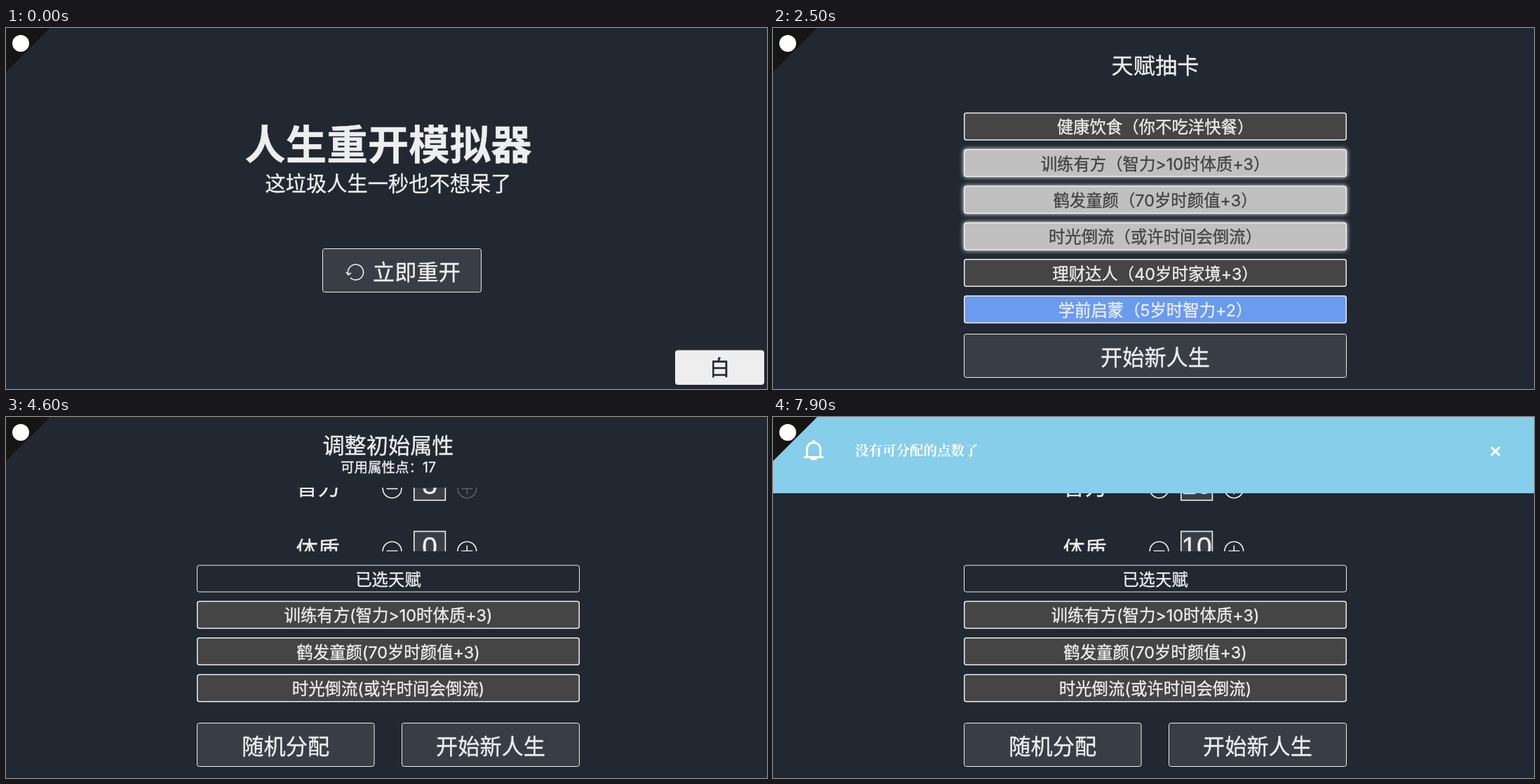
Animation of 1085 by 516 pixels, one loop 8000 ms. Source, as an HTML page:

```html
<!DOCTYPE html>
<html lang="zh-CN">
<head>
<meta charset="utf-8">
<title>人生重开模拟器</title>
<style>
  html, body { margin: 0; width: 100%; height: 100%; overflow: hidden; background: #222831; }
  svg { display: block; width: 1085px; height: 516px; }
  text {
    font-family: Inter, "Noto Sans CJK SC", "Noto Sans CJK", sans-serif; font-variant-ligatures: no-contextual;
    color: #eee; fill: currentColor; stroke: currentColor; stroke-width: .35;
    text-anchor: middle; white-space: pre;
  }
  .ui { font-family: "Liberation Sans", "Noto Sans CJK SC", "Noto Sans CJK", sans-serif; }
  .hint { font-family: "Noto Serif CJK SC", "Noto Sans CJK SC", "Noto Sans CJK", serif; font-weight: 700; color: #fff; stroke: none; text-anchor: start; }
  .line { fill: none; stroke: #eee; stroke-width: 1.6; }
  .icon { fill: none; stroke: #fff; stroke-width: 3; }
</style>
</head>
<body>
<svg viewBox="0 0 1085 516">
  <defs><clipPath id="window"><rect x="266" y="101" width="558" height="91"/></clipPath></defs>
  <g id="home"></g>
  <g id="talent"></g>
  <g id="attributes"></g>
  <g id="banner">
    <rect width="1085" height="109" fill="#87ceeb"/>
    <path class="icon" d="M48.5 56V46a9.5 9.5 0 0 1 19 0V56M44 57.500H72M58 33V37M53.500 60H62.500"/>
    <path class="icon" d="M1024 43L1036 55M1036 43L1024 55"/>
    <text class="hint" x="117" y="54.500" font-size="19.5">没有可分配的点数了</text>
  </g>
  <path d="M0 0H63L0 63Z" fill="#151513"/>
  <circle cx="21" cy="22" r="12" fill="#fff"/>
</svg>
<script>
const LOOP = 8000, TICK = 100, REM = 19.5, MID = 545, CARD_STEP = 52.3;
const BUTTON = [57, 62, 70], BUTTON_HOVER = [77, 68, 75];
const CARD = [70, 69, 69], CARD_HOVER = [80, 80, 80], PICKED = [192, 192, 192];
const BLUE = [100, 149, 237], BLUE_HOVER = [105, 155, 239];
const LIGHT = [238, 238, 238], DARK = [68, 68, 68];

const $ = id => document.getElementById(id);
const rgb = c => `rgb(${c.map(Math.round)})`;
const mix = (a, b, p) => rgb(a.map((v, i) => v + (b[i] - v) * p));
const ramp = (t, from, to) => Math.min(1, Math.max(0, (t - from) / (to - from)));
const pulse = (t, start, end, fade = 200) => ramp(t, start - TICK, start + TICK) * (1 - ramp(t, end, end + fade));
const during = (t, from, to) => t >= from && t < to;

function add(parent, tag, attrs, content = '') {
  const el = document.createElementNS('http://www.w3.org/2000/svg', tag);
  for (const key in attrs) el.setAttribute(key, attrs[key]);
  el.textContent = content;
  return parent.appendChild(el);
}

function label(parent, x, middle, rem, content, attrs = {}) {
  const size = rem * REM;
  return add(parent, 'text', { x, y: middle + size * .37, 'font-size': size, ...attrs }, content);
}

function panel(parent, x, y, w, h, fill, border = 1) {
  const inset = border / 2;
  return add(parent, 'rect', {
    x: x + inset, y: y + inset, width: w - border, height: h - border,
    rx: 3, fill, stroke: '#eee', 'stroke-width': border
  });
}

function button(parent, x, y, w, content, shift = 0) {
  const box = panel(parent, x, y, w, 63, rgb(BUTTON));
  const text = label(parent, x + w / 2 + shift, y + 33.5, 1.6, content, { class: 'ui' });
  return { box, text };
}

function card(parent, y, content, fill = CARD) {
  const box = panel(parent, 272, y, 546, 40, rgb(fill), 1.5);
  return { box, text: label(parent, MID, y + 21, 1.2, content) };
}

// Start page
const home = $('home');
label(home, MID, 166, 3, '人生重开模拟器', { 'font-weight': 700 });
label(home, MID, 222, 1.5, '这垃圾人生一秒也不想呆了');
button(home, 451, 315, 227, '立即重开', 21);
add(home, 'path', { class: 'line', d: 'M488 352A11 11 0 1 1 491 357M485 349L488 353L492 350' });
panel(home, 954, 460.5, 127, 49.5, '#eee');
label(home, 1017.5, 485, 1.5, '白', { style: 'color:#222831' });

// Talent page
const talent = $('talent');
label(talent, MID, 53, 1.6, '天赋抽卡');
const drawGroup = add(talent, 'g', {});
const draw = button(drawGroup, 449, 258, 192, '10连抽！');
const cardGroup = add(talent, 'g', {});
const cards = [
  '健康饮食（你不吃洋快餐）', '训练有方（智力>10时体质+3）', '鹤发童颜（70岁时颜值+3）',
  '时光倒流（或许时间会倒流）', '理财达人（40岁时家境+3）', '学前启蒙（5岁时智力+2）'
].map((content, i) => card(cardGroup, 120.8 + i * CARD_STEP, content, i === 5 ? BLUE : CARD));
const next = button(cardGroup, 272, 437, 546, '');
const pickTimes = { 1: 1700, 2: 1900, 3: 2200 };

// Attribute page
const attributes = $('attributes');
label(attributes, MID, 40, 1.6, '调整初始属性');
const points = label(attributes, MID, 72, 1, '');
const rows = add(attributes, 'g', { 'clip-path': 'url(#window)' });

function attributeRow(name, y) {
  label(rows, 444.7, y - 3.5, 1.6, name);
  const sign = (x, d) => {
    const g = add(rows, 'g', { class: 'line', transform: `translate(${x} ${y})` });
    add(g, 'circle', { r: 13.3 });
    add(g, 'path', { d });
    return g;
  };
  sign(550.5, 'M-8 0H8');
  const plus = sign(657.3, 'M-8 0H8M0-8V8');
  add(rows, 'rect', { x: 581.8, y: y - 28, width: 44.6, height: 44.5, fill: '#393e46', stroke: '#eee', 'stroke-width': 1.6 });
  const value = add(rows, 'text', { class: 'ui', x: 604, y: y + 7.5, 'font-size': 2 * REM });
  return { plus, value };
}

const stats = [
  { ...attributeRow('智力', 102.5), hover: [4100, 5900],
    clicks: [4300, 4500, 4600, 4700, 4800, 5000, 5100, 5200, 5300, 5500] },
  { ...attributeRow('体质', 191.5), hover: [6100, 7700],
    clicks: [6200, 6400, 6500, 6600, 6700, 6900, 7000, 7100, 7300, 7400] }
];
panel(attributes, 272, 211.5, 546, 39, 'none');
label(attributes, MID, 232, 1.2, '已选天赋');
const chosen = ['训练有方(智力>10时体质+3)', '鹤发童颜(70岁时颜值+3)', '时光倒流(或许时间会倒流)']
  .map((content, i) => card(attributes, 262.8 + i * CARD_STEP, content));
button(attributes, 272, 437, 253.5, '随机分配');
const start = button(attributes, 564, 437, 254, '开始新人生');

const show = (el, on) => { el.style.display = on ? '' : 'none'; };
const paint = ({ box }, a, b, p) => box.setAttribute('fill', mix(a, b, p));

function renderTalent(t) {
  show(drawGroup, t < 1000);
  show(cardGroup, t >= 1000);
  paint(draw, BUTTON, BUTTON_HOVER, Math.max(1 - ramp(t, 200, 400), ramp(t, 700, 900)));
  paint(next, BUTTON, BUTTON_HOVER, ramp(t, 2500, 2700));
  next.text.textContent = t < 2200 ? '请选择3个' : '开始新人生';
  paint(cards[5], BLUE, BLUE_HOVER, pulse(t, 2400, 2500));

  for (const [i, time] of Object.entries(pickTimes)) {
    const picked = ramp(t, time - TICK, time + 200);
    const item = cards[i];
    if (picked) paint(item, CARD_HOVER, PICKED, picked);
    else paint(item, CARD, CARD_HOVER, ramp(t, time - 3 * TICK, time - TICK));
    item.text.style.color = mix(LIGHT, DARK, picked);
    item.box.style.filter = picked ? `drop-shadow(0 0 3px rgba(255,255,255,${picked}))` : 'none';
  }
}

function renderAttributes(t) {
  let spent = 0;
  for (const { plus, value, hover, clicks } of stats) {
    const count = clicks.filter(time => time <= t).length;
    spent += count;
    value.textContent = count;
    plus.setAttribute('opacity', during(t, ...hover) ? .28 : 1);
  }
  points.textContent = `可用属性点：${20 - spent}`;
  paint(start, BUTTON, BUTTON_HOVER, 1 - ramp(t, 2900, 3200));
  paint(chosen[2], CARD, CARD_HOVER, pulse(t, 3000, 3000));
  paint(chosen[1], CARD, CARD_HOVER, pulse(t, 3200, 3200));
}

function render(t) {
  show(home, t < 200);
  show(talent, during(t, 200, 2800));
  show(attributes, t >= 2800);
  renderTalent(t);
  renderAttributes(t);
  show($('banner'), t >= 7600);
  const left = 1 - ramp(t, 7500, 7900);
  $('banner').setAttribute('transform', `translate(0 ${-109 * left ** 2})`);
}

const begin = performance.now();
function frame() {
  const t = (performance.now() - begin) % LOOP;
  render(Math.floor(t / TICK) * TICK);
  requestAnimationFrame(frame);
}
frame();
</script>
</body>
</html>
```
